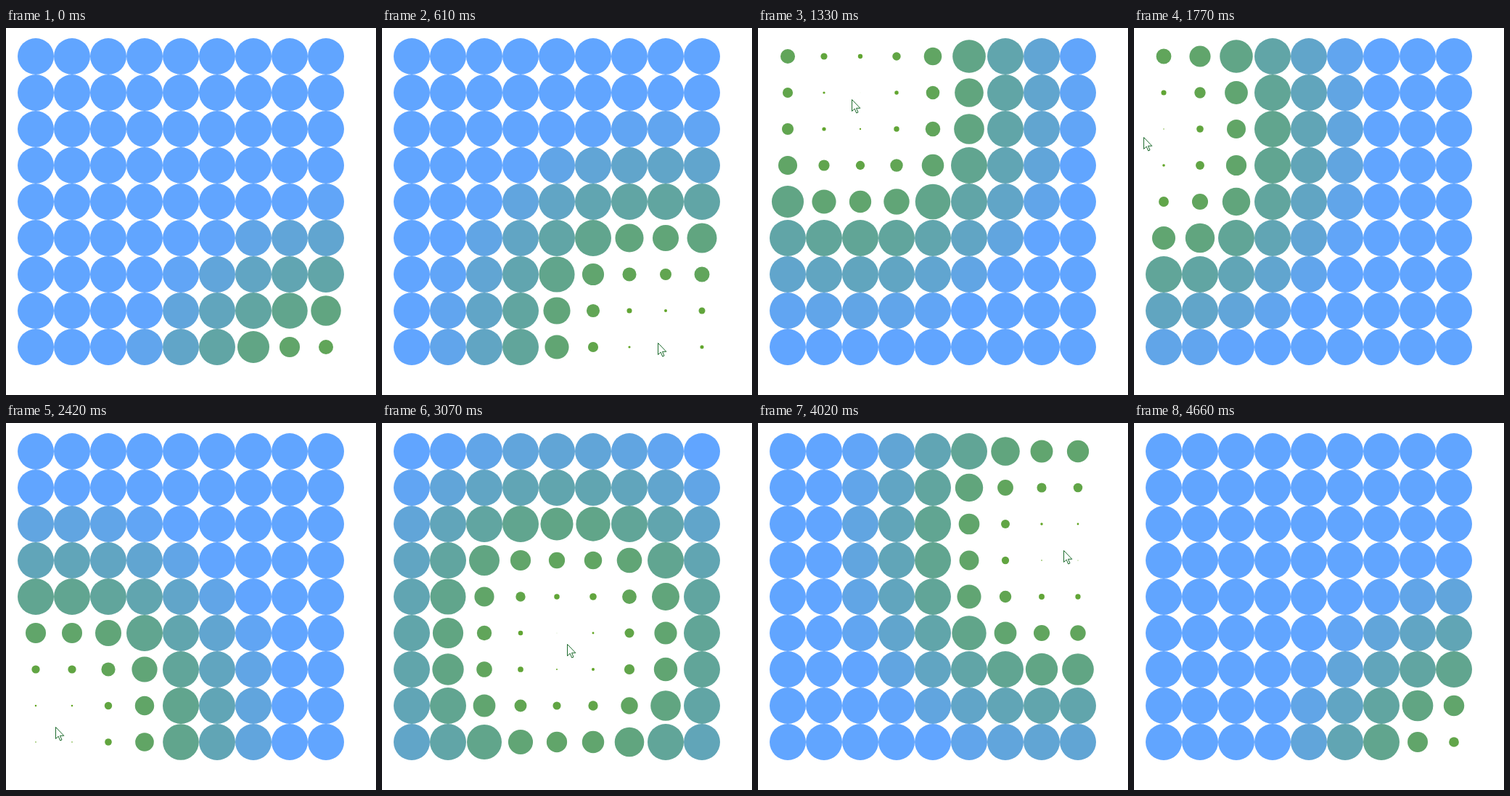
Write an HTML page with a canvas that moves like this. It is 510 px wide and 505 px high and loops after 5210 ms.

```html
<!DOCTYPE html>
<html lang="en">
<head>
<meta charset="utf-8">
<title>Dots shrinking near the pointer</title>
<style>
  html, body { margin: 0; width: 100%; height: 100%; overflow: hidden; background: #fff; }
  canvas { display: block; }
</style>
</head>
<body>
<canvas id="stage" width="510" height="505"></canvas>
<script>
const ctx = document.getElementById('stage').getContext('2d');
const LOOP = 5210, STEP = 80, POINTER_LEAD = 12;
const COUNT = 9, PITCH = 50, LEFT = 41, TOP = 39, MAX_RADIUS = 25;

// Turning points of the pointer
const stops = [
  { t: 370, x: 466, y: 548 },
  { t: 610, x: 385, y: 439 },
  { t: 1330, x: 134, y: 101.5 },
  { t: 1500, x: 72, y: 78 },
  { t: 1770, x: 14, y: 150 },
  { t: 2010, x: 14, y: 150 },
  { t: 2420, x: 66, y: 419 },
  { t: 3070, x: 252.5, y: 306.5 },
  { t: 4020, x: 420, y: 175 },
  { t: 4500, x: 481, y: 427 },
  { t: 4660, x: 505, y: 506 }
];
const lastLeg = stops.length - 2;
const arrow = new Path2D('M0 0V16L3.7 12.6L6.2 18.5L8.5 17.5L6 11.8H11.3Z');

const clamp = (value, low, high) => Math.min(Math.max(value, low), high);

function legAt(time) {
  const next = stops.findIndex(stop => stop.t > time);
  return next < 0 ? lastLeg : Math.max(next - 1, 0);
}

function secant(leg, axis) {
  const a = stops[leg], b = stops[leg + 1];
  return (b[axis] - a[axis]) / (b.t - a.t);
}

// Harmonic mean of both sides: zero at a turn, so the curve never overshoots.
function slope(i, axis) {
  const before = secant(Math.max(i - 1, 0), axis);
  const after = secant(Math.min(i, lastLeg), axis);
  return before * after <= 0 ? 0 : 2 * before * after / (before + after);
}

function pointerAt(time) {
  const leg = legAt(time), a = stops[leg], b = stops[leg + 1];
  const span = b.t - a.t;
  const u = clamp((time - a.t) / span, 0, 1), v = 1 - u;
  return ['x', 'y'].map(axis =>
    (1 + 2 * u) * v * v * a[axis] + u * v * v * span * slope(leg, axis) +
    u * u * (3 - 2 * u) * b[axis] - u * u * v * span * slope(leg + 1, axis));
}

// The picture advances in even steps of about STEP within each leg.
function hold(time) {
  const leg = legAt(time), start = stops[leg].t;
  const span = stops[leg + 1].t - start;
  const step = span / Math.round(span / STEP);
  return start + Math.floor((time - start) / step) * step;
}

function drawDot(x, y, distance) {
  const radius = Math.min(MAX_RADIUS, distance * distance / 1250);
  const blue = Math.min(255, Math.round(distance * 0.8));
  ctx.fillStyle = `rgb(97,165,${blue})`;
  ctx.beginPath();
  ctx.arc(x, y, radius, 0, Math.PI * 2);
  ctx.fill();
}

function drawPointer(x, y) {
  ctx.save();
  ctx.translate(Math.floor(x) + 0.5, Math.floor(y) + 0.5);
  ctx.fillStyle = '#fff';
  ctx.strokeStyle = '#1d6b2d';
  ctx.fill(arrow);
  ctx.stroke(arrow);
  ctx.restore();
}

function draw(time) {
  ctx.fillStyle = '#fff';
  ctx.fillRect(0, 0, 510, 505);
  const [px, py] = pointerAt(time);
  for (let row = 0; row < COUNT; row++) {
    for (let col = 0; col < COUNT; col++) {
      const x = LEFT + col * PITCH, y = TOP + row * PITCH;
      drawDot(x, y, Math.hypot(x - px, y - py));
    }
  }
  drawPointer(...pointerAt(time + POINTER_LEAD));
}

const began = performance.now();
function frame() {
  draw(hold((performance.now() - began) % LOOP));
  requestAnimationFrame(frame);
}
frame();
</script>
</body>
</html>
```
